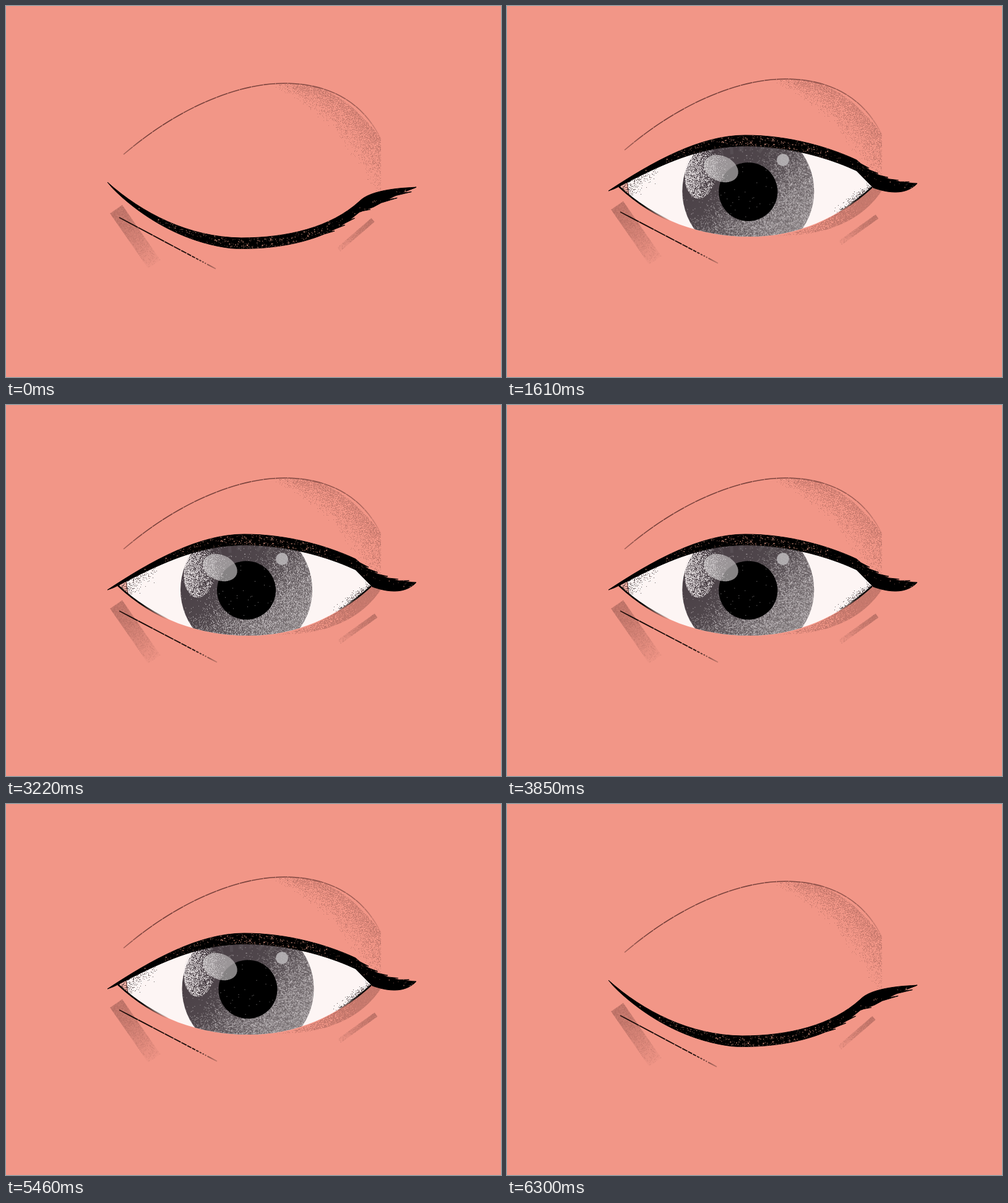
These frames come from a looping animation (800x600 px, 7350 ms). An HTML page with a canvas:

```html
<!DOCTYPE html>
<html lang="en">
<head>
<meta charset="utf-8">
<title>Blinking eye</title>
<style>
  html, body { margin: 0; width: 100%; height: 100%; overflow: hidden; background: #f29687; }
  canvas { display: block; }
</style>
</head>
<body>
<canvas id="stage" width="800" height="600"></canvas>
<script>
const ctx = document.getElementById('stage').getContext('2d');
const LOOP = 7350, STEP = 70;

// ---------- helpers ----------
let seed = 71;
const rnd = () => {
  seed = (seed + 0x6D2B79F5) | 0;
  let r = Math.imul(seed ^ (seed >>> 15), 1 | seed);
  r = (r + Math.imul(r ^ (r >>> 7), 61 | r)) ^ r;
  return ((r ^ (r >>> 14)) >>> 0) / 4294967296;
};
const clamp = v => Math.max(0, Math.min(1, v));
const mix = (a, b, k) => a + (b - a) * k;
const mixAll = (a, b, k) => a.map((v, i) => mix(v, b[i], k));
const smooth = v => { v = clamp(v); return v * v * (3 - 2 * v); };
const ramp = (t, a, b) => smooth((t - a) / (b - a));
const line = (t, a, b) => clamp((t - a) / (b - a));

// random specks whose density follows a formula
function grain(x, y, w, h, rgb, alpha, density) {
  const c = document.createElement('canvas');
  c.width = w; c.height = h;
  const g = c.getContext('2d'), img = g.createImageData(w, h);
  for (let j = 0; j < h; j++) for (let i = 0; i < w; i++) {
    if (rnd() < density(x + i, y + j)) {
      img.data.set([...rgb, alpha * (0.7 + 0.3 * rnd())], (j * w + i) * 4);
    }
  }
  g.putImageData(img, 0, 0);
  return { c, x, y };
}
const put = g => ctx.drawImage(g.c, g.x, g.y);

// cubic chain: x, y, then six numbers per segment
function curve(p) {
  ctx.moveTo(p[0], p[1]);
  for (let i = 2; i < p.length; i += 6) ctx.bezierCurveTo(...p.slice(i, i + 6));
}
function cubicAt(p, s) {
  const n = Math.min(1, Math.floor(s)), t = s - n, u = 1 - t, o = n * 6;
  return [0, 1].map(i => u*u*u * p[o+i] + 3*u*u*t * p[o+i+2] + 3*u*t*t * p[o+i+4] + t*t*t * p[o+i+6]);
}
const quadAt = (a, c, b, t) => mixAll(mixAll(a, c, t), mixAll(c, b, t), t);
const trace = pts => pts.forEach(p => ctx.lineTo(p[0], p[1]));

// samples a path and adds n hairs that lean forward; side 1 is up, -1 down
function hairy(at, n, size, side) {
  const pts = [at(0)];
  for (let i = 1; i <= n; i++) {
    const t = i / (n + 1), [x, y] = at(t), [x2, y2] = at(t + 0.02);
    const d = Math.hypot(x2 - x, y2 - y), dx = (x2 - x) / d * size, dy = (y2 - y) / d * size;
    pts.push(at(t - 0.5 / (n + 1)));
    pts.push([x + dx + dy * 0.35 * side, y + dy - dx * 0.35 * side], [x - dx * 0.2, y - dy * 0.2]);
  }
  pts.push(at(1));
  return pts;
}

function fade(x0, x1, rgb, ...stops) {
  const g = ctx.createLinearGradient(x0, 0, x1, 0);
  stops.forEach(([o, a]) => g.addColorStop(o, `rgba(${rgb},${a})`));
  return g;
}
function ellipse(x, y, rx, ry, turn = 0) {
  ctx.beginPath();
  ctx.ellipse(x, y, rx, ry, turn, 0, Math.PI * 2);
}
function layer(draw) { ctx.save(); draw(); ctx.restore(); }

// ---------- key shapes ----------
const LID_OPEN = [164,299, 235,252, 312,209, 385,209, 455,209, 520,228, 565,249];
const LID_SHUT = [164,285, 220,335, 295,374, 380,375, 455,375, 525,358, 571,316];
const WING_OPEN = { over: [605,286], tip: [663,287], below: [640,311], corner: [592,294] };
const WING_SHUT = { over: [590,296], tip: [663,293], below: [632,304], corner: [594,325] };
const LOWER = [181,292, 240,347, 312,373, 392,373, 470,373, 535,343, 590,293];
const CREASE = [190,233, 274,161, 370,118, 450,118, 530,118, 580,155, 605,207];

const thickness = x => 17.5 * Math.pow(clamp((x - 164) / 200), 0.6);

function lashShape(k, merge) {
  const lid = mixAll(LID_OPEN, LID_SHUT, k);
  const w = {};
  for (const key in WING_OPEN) w[key] = mixAll(WING_OPEN[key], WING_SHUT[key], k);
  const top = s => cubicAt(lid, s);
  const under = s => { const [x, y] = top(s); return [x, y + thickness(x)]; };
  const shut = clamp(k), up = 7 * (1 - shut) * (1 - 0.4 * merge);
  const below = [
    ...hairy(t => under(2 * t), 0, 0, -1).slice(0, 1),
    ...Array.from({ length: 36 }, (_, i) => under(i * 1.6 / 36)),
    ...hairy(t => under(1.6 + 0.4 * t), 3, 7 * shut, -1),
    ...hairy(t => mixAll(under(2), w.corner, t), 1, 6 * shut, -1),
    ...hairy(t => quadAt(w.corner, w.below, w.tip, t), 2, 13 * shut, -1),
    ...Array.from({ length: 6 }, (_, i) => quadAt(w.corner, w.below, w.tip, 0.75 + i * 0.05))
  ];
  if (shut < 0.1) {
    below.splice(-15, 15, ...Array.from({ length: 13 }, (_, i) => quadAt(w.corner, w.below, w.tip, i / 12)));
  }
  return { lid, w, top, under, below, over: hairy(t => quadAt(top(2), w.over, w.tip, t), 5, up, 1) };
}

// ---------- textures ----------
const BROWN = [118, 66, 60], INK = [50, 38, 40];
const creaseY = x => 118 + 89 * Math.pow(clamp((x - 450) / 155), 2.4);
const lidGrain = grain(425, 112, 181, 180, BROWN, 95, (x, y) => {
  const d = y - creaseY(x), depth = (x - 420) / 184 * 110;
  return d < 0 ? 0 : 0.66 * Math.pow(clamp(1 - d / depth), 1.3) * clamp((x - 425) / 45);
});
const bagGrain = grain(0, -12, 108, 24, BROWN, 60, x => 0.65 - x / 190);
const barGrain = grain(0, -4, 73, 8, BROWN, 60, x => 0.65 - x / 140);
const underGrain = grain(425, 290, 185, 90, BROWN, 105, x => clamp((x - 420) / 150));
const irisGrain = grain(284, 192, 214, 214, [212, 206, 208], 215, (x, y) => {
  const v = ((x - 391) * 0.6 + (y - 300) * 0.7) / 106;
  return 0.02 + 0.42 * smooth((v + 0.35) / 0.85);
});
const pupilGrain = grain(343, 253, 95, 95, [220, 214, 214], 190, () => 0.004);
const glossGrain = grain(284, 222, 60, 92, [240, 234, 235], 235, (x, y) =>
  clamp(0.85 - (x - 288) / 75 - Math.max(0, 250 - y) / 110));
const spotGrain = grain(316, 238, 60, 50, [235, 231, 232], 170, x => 0.35 * clamp(1 - (x - 318) / 42));
const innerGrain = grain(182, 236, 74, 70, INK, 215, (x, y) => {
  const d = y - (294 - (x - 181) * 0.62);
  return 0.38 * clamp(1 - (x - 194) / 56) * clamp(1 - d / 34);
});
const outerGrain = grain(525, 285, 70, 60, INK, 215, (x, y) =>
  0.45 * clamp(1 - (293 + (590 - x) * 0.72 - y) / 15) * clamp((x - 528) / 40));

const speck = () => ({ v: rnd(), r: 0.35 + rnd() * rnd() * 0.75, a: 0.3 + rnd() * 0.6 });
const lashSpecks = Array.from({ length: 340 }, () =>
  ({ s: mix(0.25, 1.95, (rnd() + rnd()) / 2), ...speck() }));
const wingSpecks = Array.from({ length: 70 }, () => ({ s: rnd(), ...speck() }));
const bagDashes = Array.from({ length: 24 }, (_, i) => i % 2 ? 0.6 + 0.07 * i : 34 * Math.pow(0.88, i));

// ---------- parts ----------
function drawCrease(k) {
  layer(() => {
    ctx.translate(0, 7 * k);
    put(lidGrain);
    ctx.beginPath();
    curve(CREASE);
    ctx.lineWidth = 1.6;
    ctx.setLineDash([19, 0.7]);
    ctx.strokeStyle = fade(190, 606, '95,48,44', [0, 0.5], [0.1, 0.85], [0.6, 0.8], [0.9, 0.55], [1, 0.15]);
    ctx.stroke();
  });
}

function drawBar(tex, x, y, turn) {
  const { width, height } = tex.c;
  layer(() => {
    ctx.translate(x, y);
    ctx.rotate(turn);
    ctx.fillStyle = fade(0, width, BROWN, [0, 0.32], [0.35, 0.27], [1, 0.03]);
    ctx.fillRect(0, -height / 2, width, height);
    put(tex);
  });
}

function drawBags(k) {
  drawBar(bagGrain, 178, mix(322.5, 328.7, k), 0.965);
  drawBar(barGrain, mix(598, 593, k), mix(340.5, 346, k), mix(2.519, 2.428, k));
  layer(() => {
    ctx.beginPath();
    ctx.moveTo(183, 333 + 9 * k);
    ctx.lineTo(341 - 2 * k, 416 + 9 * k);
    ctx.lineWidth = 1.9;
    ctx.setLineDash(bagDashes);
    ctx.strokeStyle = fade(183, 341, '22,9,7', [0, 0.85], [0.1, 1], [0.75, 0.95], [1, 0.2]);
    ctx.stroke();
  });
}

function drawIris(dx, dy) {
  layer(() => {
    ctx.translate(dx, dy);
    ellipse(390.5, 300, 106.5, 106.5);
    const g = ctx.createLinearGradient(335, 235, 460, 365);
    g.addColorStop(0, '#4a4046');
    g.addColorStop(0.4, '#50474c');
    g.addColorStop(1, '#7b7476');
    ctx.fillStyle = g;
    ctx.fill();
    ctx.clip();
    for (let i = 0; i < 9; i++) {
      const a = -2.9 + i * 0.23;
      ctx.beginPath();
      ctx.moveTo(390 + Math.cos(a) * 65, 300 + Math.sin(a) * 65);
      ctx.lineTo(390 + Math.cos(a + 0.12) * 98, 300 + Math.sin(a + 0.12) * 98);
      ctx.lineWidth = 3 + i % 3 * 2;
      ctx.strokeStyle = 'rgba(180,172,176,.1)';
      ctx.stroke();
    }
    put(irisGrain);
    ellipse(390.5, 301, 47.5, 47.5);
    ctx.fillStyle = '#000';
    ctx.fill();
    ctx.clip();
    put(pupilGrain);
  });
  layer(() => {
    ellipse(314, 268, 26, 44, 0.16);
    ctx.clip();
    put(glossGrain);
  });
  layer(() => {
    ellipse(346, 263, 29, 20.5, 0.42);
    ctx.fillStyle = 'rgba(186,182,184,.72)';
    ctx.fill();
    ctx.clip();
    put(spotGrain);
  });
  ellipse(446, 249, 10, 10);
  ctx.fillStyle = 'rgba(190,186,188,.85)';
  ctx.fill();
}

function drawEyeball(lash, k, dx, dy) {
  if (k > 0.985) return;
  layer(() => {
    // only what lies below the upper lid is visible
    ctx.beginPath();
    ctx.moveTo(100, 600);
    for (let i = 0; i <= 40; i++) ctx.lineTo(...lash.under(i / 20));
    trace([lash.w.corner, [700, 296], [700, 600]]);
    ctx.clip();

    layer(() => {
      ctx.globalAlpha = clamp(1.3 - 1.5 * k);
      ctx.beginPath();
      ctx.moveTo(425, 371);
      ctx.bezierCurveTo(505, 376, 575, 350, 608, 295);
      ctx.lineTo(590, 293);
      ctx.bezierCurveTo(535, 343, 470, 373, 425, 371);
      ctx.clip();
      put(underGrain);
    });

    layer(() => {
      ctx.beginPath();
      curve(LOWER);
      trace([[590, 180], [181, 180]]);
      ctx.clip();
      ctx.fillStyle = '#fdf5f4';
      ctx.fillRect(160, 180, 450, 210);
      ctx.beginPath();
      ctx.moveTo(180, 292);
      ctx.lineTo(194, 276);
      ctx.quadraticCurveTo(194, 292, 198, 308);
      ctx.fillStyle = 'rgba(242,150,135,.7)';
      ctx.fill();
      ctx.beginPath();
      ctx.moveTo(194, 276);
      ctx.quadraticCurveTo(194, 292, 198, 308);
      ctx.lineWidth = 1.4;
      ctx.strokeStyle = 'rgba(95,55,50,.8)';
      ctx.stroke();
      put(innerGrain);
      put(outerGrain);
      drawIris(dx, dy);
    });

    ctx.beginPath();
    curve(LOWER);
    ctx.lineWidth = 2.4;
    ctx.strokeStyle = fade(181, 590, '0,0,0', [0, 1], [0.09, 1], [0.2, 0], [0.86, 0], [0.95, 0.9], [1, 1]);
    ctx.stroke();
  });
}

function drawLash(lash) {
  const dot = ([x, y], d) => {
    ctx.globalAlpha = d.a;
    ctx.fillRect(x - d.r, y - d.r, d.r * 2, d.r * 2);
  };
  layer(() => {
    ctx.beginPath();
    curve(lash.lid);
    trace(lash.over);
    trace(lash.below.slice().reverse());
    ctx.closePath();
    ctx.fillStyle = '#000';
    ctx.fill();
    ctx.lineWidth = 1;
    ctx.stroke();
    ctx.clip();
    ctx.fillStyle = '#f0a58f';
    for (const d of lashSpecks) dot(mixAll(lash.top(d.s), lash.under(d.s), d.v), d);
    for (const d of wingSpecks) {
      const [x, y] = mixAll(lash.under(1.9), lash.w.tip, d.s);
      dot([x, y + (d.v - 0.5) * 24], d);
    }
  });
}

// ---------- motion ----------
// every sixth step repeats the one before
function stepped(ms) {
  const n = Math.floor(ms / STEP);
  const held = n > 0 && n < 90 && n % 6 === (n < 13 ? 0 : 3);
  return Math.min(n - held, 90) * STEP;
}

function draw(t) {
  const blink = clamp(1 - Math.abs(t - 2870) / 140);
  const squint = 0.3 * Math.sin(Math.PI * line(t, 0, 490));
  const k = 1 - ramp(t, 350, 770) + blink + ramp(t, 5490, 6230);
  const calm = 1 - ramp(t, 350, 770) + squint;
  const merge = t < 2870 ? line(t, 840, 2660) : 0;
  const dx = -2 * line(t, 840, 3080) + 3 * line(t, 3220, 4700) - 0.5 * line(t, 4900, 5460);
  const dy = -1.3 * line(t, 840, 2520);
  const lash = lashShape(k, merge);

  ctx.fillStyle = '#f29687';
  ctx.fillRect(0, 0, 800, 600);
  drawCrease(calm + ramp(t, 5600, 6300));
  drawBags(calm + line(t, 5460, 6300));
  drawEyeball(lash, k, dx, dy);
  drawLash(lash);
}

const start = performance.now();
let last = -1;
function tick() {
  const t = stepped((performance.now() - start) % LOOP);
  if (t !== last) draw(last = t);
  requestAnimationFrame(tick);
}
tick();
</script>
</body>
</html>
```
